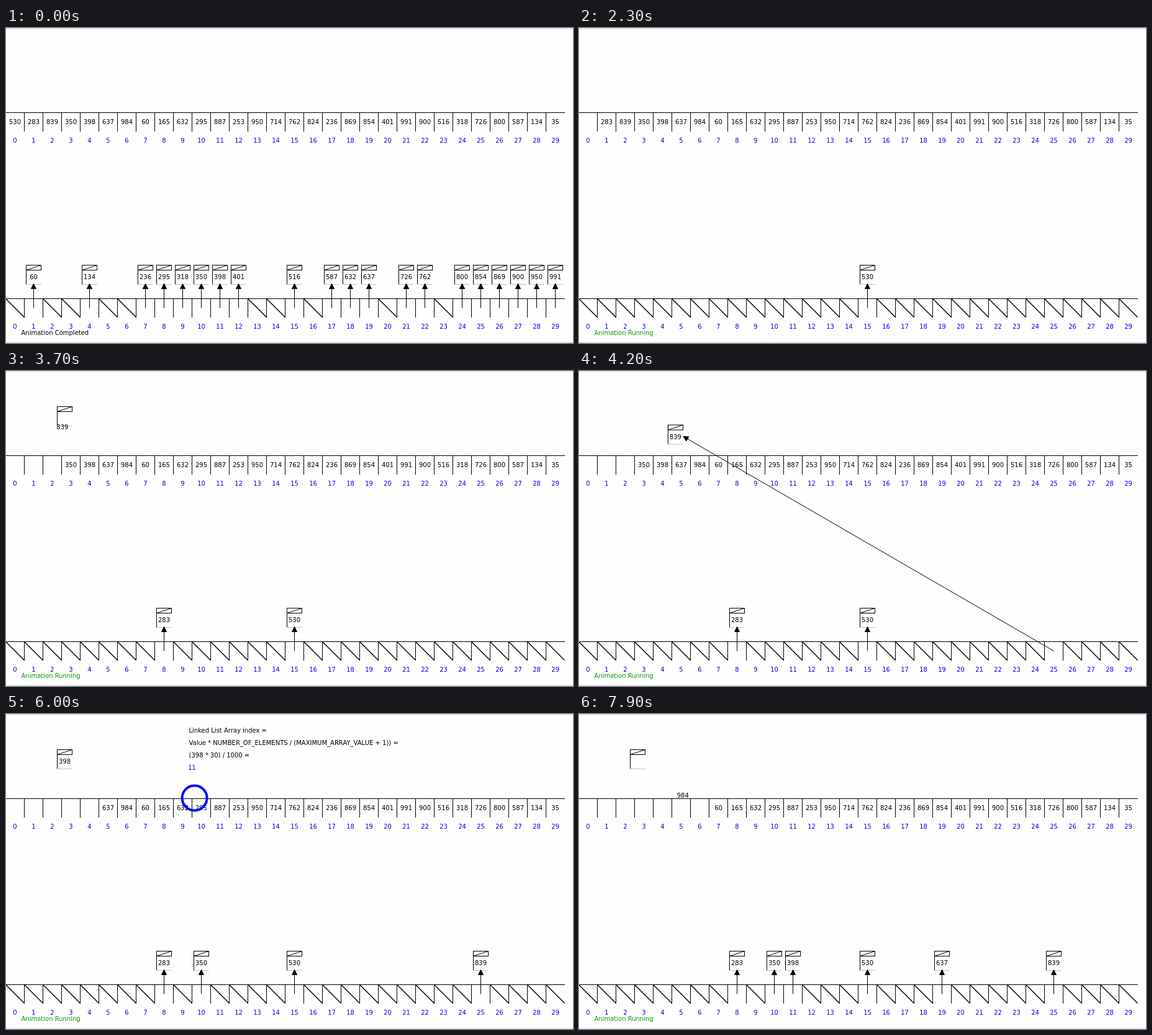
Recreate the animation shown at these times as an HTML page with a canvas. Size 913 by 508 pixels, loop 8 s.

```html
<!DOCTYPE html>
<html lang="en">
<head>
<meta charset="utf-8">
<title>Bucket sort</title>
<style>
html, body { margin: 0; width: 100%; height: 100%; overflow: hidden; background: #fefefe; }
canvas { display: block; }
</style>
</head>
<body>
<canvas id="stage" width="913" height="508"></canvas>
<script>
const ctx = document.getElementById('stage').getContext('2d');

const LOOP = 8000, STEP = 100;
const BLUE = '#0000ff', BLACK = '#000000';
const CELL = 30, COUNT = 30, RANGE = 1000;
const TOP_ROW = 136.5, BUCKET_ROW = 436.5;
const NODE_W = 24, NODE_H = 30, LINK_H = 8;
const HOME = { x: 94.5, y: 57.5 };
const REST_Y = 382.5;
const CIRCLE = { x: 299.5, y: 101 };
const TICKS = 12;          // ticks per phase; three phases per value
const TICK_RATE = 0.0329;  // ticks per millisecond
const START = 1226;

const values = [530, 283, 839, 350, 398, 637, 984, 60, 165, 632,
  295, 887, 253, 950, 714, 762, 824, 236, 869, 854,
  401, 991, 900, 516, 318, 726, 800, 587, 134, 35];

const cellX = i => 14.5 + CELL * i;
const bucketOf = v => Math.floor(v * COUNT / RANGE);
const lerp = (a, b, p) => a + (b - a) * p;

function text(str, x, y, color = BLACK, align = 'center') {
  ctx.fillStyle = color;
  ctx.textAlign = align;
  ctx.fillText(str, x, y + 4);
}

function line(x1, y1, x2, y2, color = BLACK, width = 1) {
  ctx.strokeStyle = color;
  ctx.lineWidth = width;
  ctx.beginPath();
  ctx.moveTo(x1, y1);
  ctx.lineTo(x2, y2);
  ctx.stroke();
}

function drawRow(y) {
  line(0, y, 900, y);
  for (let i = 0; i < COUNT; i++) {
    if (i) line(CELL * i - 0.5, y - 0.5, CELL * i - 0.5, y + 30.5);
    text(i, cellX(i), y + 44.5, BLUE);
  }
}

function drawNode(x, y, label) {
  const left = x - NODE_W / 2, right = x + NODE_W / 2;
  ctx.fillStyle = '#ffffff';
  ctx.fillRect(left, y, NODE_W, NODE_H);
  line(left, y + NODE_H + 1, left, y);
  line(left, y + NODE_H + 1, right + 0.5, y + NODE_H + 1, '#c4c4c4');
  ctx.strokeStyle = BLACK;
  ctx.strokeRect(left, y, NODE_W, LINK_H);
  line(left, y + LINK_H, right, y);
  if (label) text(label, x, y + 18.5);
}

// The arrow meets the node on whichever side is farther from the bucket.
function drawArrow(bucket, x, y) {
  const fx = cellX(bucket), fy = BUCKET_ROW + 15;
  const half = NODE_W / 2 + 0.5;
  const dx = Math.abs(fx - x) - half, dy = fy - (y + NODE_H);
  const side = dx > dy;
  const tx = side ? x + half * Math.sign(fx - x) : x;
  const ty = side ? y + 18.5 : y + NODE_H;
  const len = Math.hypot(tx - fx, ty - fy);
  const ux = (tx - fx) / len, uy = (ty - fy) / len;
  line(fx, fy, tx, ty);
  const bx = tx - ux * 8, by = ty - uy * 8;
  ctx.fillStyle = BLACK;
  ctx.beginPath();
  ctx.moveTo(tx, ty);
  ctx.lineTo(bx + uy * 4, by - ux * 4);
  ctx.lineTo(bx - uy * 4, by + ux * 4);
  ctx.closePath();
  ctx.fill();
  ctx.stroke();
}

function drawFormula(v) {
  text('Linked List Array index =', 294.5, 26, BLACK, 'left');
  text('Value * NUMBER_OF_ELEMENTS / (MAXIMUM_ARRAY_VALUE + 1)) =', 294.5, 46, BLACK, 'left');
  text(`(${v} * ${COUNT}) / ${RANGE} =`, 294.5, 66, BLACK, 'left');
  text(bucketOf(v), 299.5, 86, BLUE);
}

function drawCircle(bucket, p) {
  ctx.strokeStyle = BLUE;
  ctx.lineWidth = 4;
  ctx.beginPath();
  ctx.arc(lerp(CIRCLE.x, cellX(bucket), p), lerp(CIRCLE.y, 481, p), 20, 0, Math.PI * 2);
  ctx.stroke();
}

function draw(time) {
  const running = time >= START;
  const tick = running ? Math.floor((time - START) * TICK_RATE) : 0;
  const phase = Math.floor(tick / TICKS);
  const p = (tick % TICKS) / (TICKS - 1);
  const current = running ? Math.floor(phase / 3) : -1;
  const stage = phase % 3;

  ctx.fillStyle = '#fefefe';
  ctx.fillRect(0, 0, 913, 508);
  ctx.fillStyle = '#dfebe3';
  ctx.fillRect(0, 0, 913, 2);
  ctx.fillRect(0, 506, 913, 2);
  ctx.font = '10px "DejaVu Sans", sans-serif';

  drawRow(TOP_ROW);
  drawRow(BUCKET_ROW);
  values.forEach((v, i) => {
    if (i > current) text(v, cellX(i), 151);
  });

  const linked = values.slice(0, current + (running && stage === 2 ? 1 : 0));
  const used = new Set(linked.map(bucketOf));
  for (let i = 0; i < COUNT; i++) {
    if (!used.has(i)) {
      line(CELL * i - 0.5, BUCKET_ROW, CELL * i + 29.5, BUCKET_ROW + 30, BLACK, 1.4);
    }
  }

  if (running) text('Animation Running', 24.5, 491, '#009900', 'left');
  else text('Animation Completed', 24.5, 491, BLACK, 'left');

  const arrows = linked.map((v, i) => {
    const b = bucketOf(v), q = i === current ? p : 1;
    return [b, lerp(HOME.x, cellX(b), q), lerp(HOME.y, REST_Y, q)];
  });
  arrows.forEach(([, x, y], i) => drawNode(x, y, linked[i]));

  if (running && stage < 2) {
    const v = values[current];
    drawNode(HOME.x, HOME.y, stage ? v : '');
    if (stage === 0) {
      text(v, lerp(cellX(current), HOME.x, p), lerp(151, 76, p));
    } else {
      drawFormula(v);
    }
  }
  arrows.forEach(a => drawArrow(...a));
  if (running && stage === 1) drawCircle(bucketOf(values[current]), p);
}

const began = performance.now();
function loop() {
  const t = (performance.now() - began) % LOOP;
  draw(Math.floor(t / STEP) * STEP);
  requestAnimationFrame(loop);
}
loop();
</script>
</body>
</html>
```
